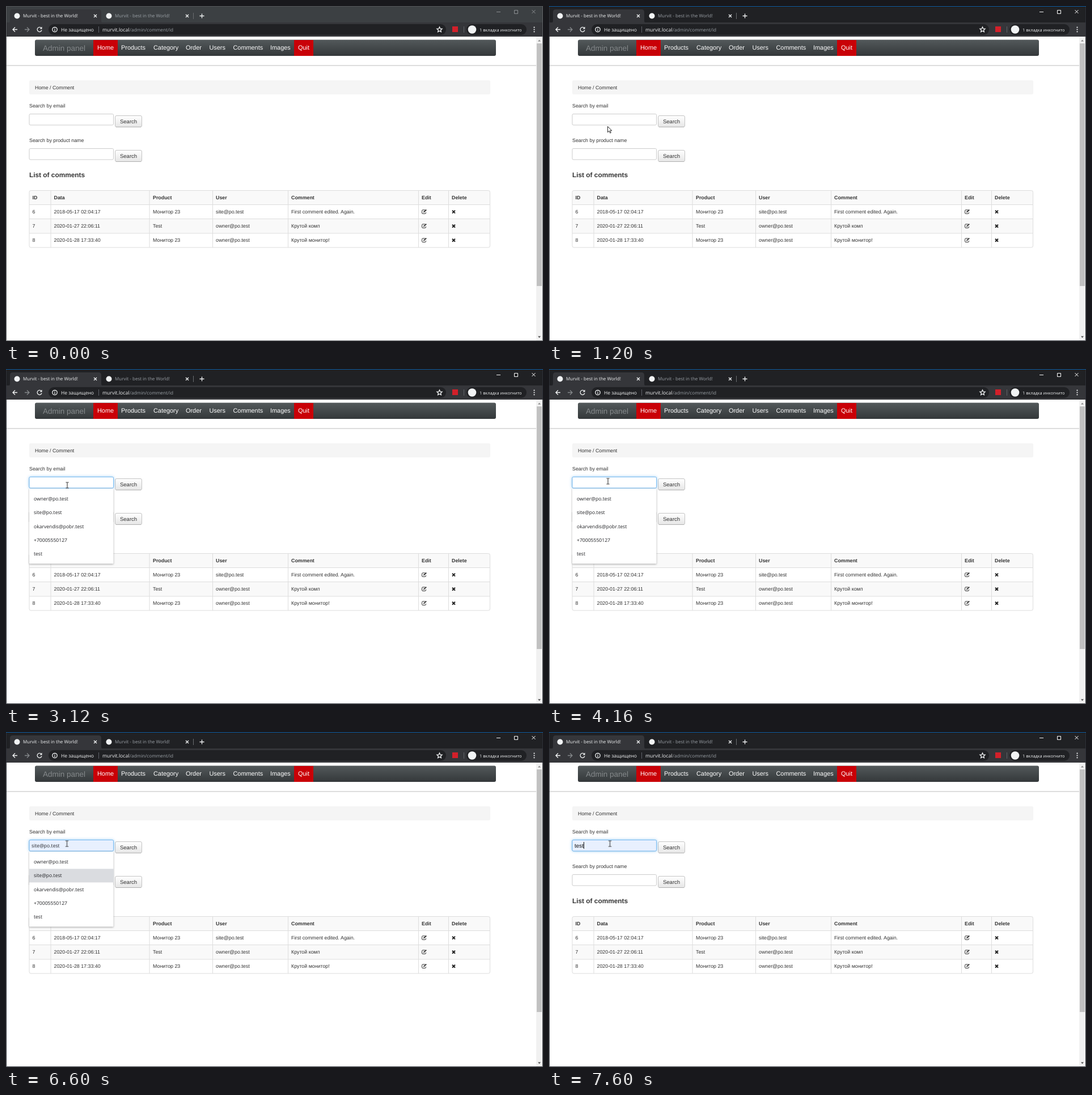
Write an HTML page that moves like this. It is 947 px wide and 591 px high and loops after 8 s.

```html
<!DOCTYPE html>
<html lang="en">
<head>
<meta charset="utf-8">
<title>Comment search</title>
<style>
html, body { margin: 0; width: 100%; height: 100%; overflow: hidden; background: #fff; }
svg { display: block; width: 947px; height: 591px; }
text { font: 8.85px "Liberation Sans", Arial, sans-serif; fill: #333; text-rendering: geometricPrecision; }
rect { shape-rendering: crispEdges; }
.round { shape-rendering: auto; }
.ui text { font-family: "Open Sans", "Noto Sans", sans-serif; font-size: 8px; fill: #f1f3f4; }
.ui .dim { fill: #9aa0a6; }
.ui .url { font-size: 8.5px; }
.line { fill: none; stroke: #f1f3f4; stroke-width: 1.3; }
.nav text { font-size: 10.9px; fill: #fff; }
.nav .brand { font-size: 13.5px; fill: #85898b; }
.button text { font-size: 9.5px; }
.field { fill: #fff; stroke: #ccc; }
.bold { font-weight: bold; }
.list text { font: 500 8.6px "Open Sans", "Noto Sans", sans-serif; fill: #202124; }

/* One loop lasts 8 s, so 1% is 80 ms. */
.frame, .edge, .accent, .controls, .focus, .arrow, .beam, .click, .caret, .menu, .hover, .preview, .typed, .fill {
  animation: 8s step-end infinite;
}
.frame { animation-name: frame; }
.edge { animation-name: edge; }
.accent { animation-name: accent; }
.controls { animation-name: controls; }
.focus { animation-name: focus; animation-timing-function: linear; filter: drop-shadow(0 0 2.5px rgba(82,168,236,.6)); }
.fill { animation-name: fill; }
.arrow { animation-name: arrow; animation-timing-function: linear; }
.beam { animation-name: beam; animation-timing-function: linear; }
.click { animation-name: click; }
.caret { animation-name: caret; }
.menu { animation-name: menu; }
.menu .panel { filter: drop-shadow(0 1px 1.5px rgba(0,0,0,.35)); }
.hover { animation-name: hover; }
.preview { animation-name: preview; }
.typed { animation-name: typed; }

@keyframes frame { 0% { fill: #3c4043; } 13%, 100% { fill: #202124; } }
@keyframes edge { 0% { stroke: #5c5f62; } 13%, 100% { stroke: #2c2f36; } }
@keyframes accent { 0% { fill: #505356; } 13%, 100% { fill: #0b5aa0; } }
@keyframes controls { 0% { stroke: #8b8e91; } 13%, 100% { stroke: #fff; } }
@keyframes focus { 0%, 29.5% { opacity: 0; } 32%, 100% { opacity: 1; } }
@keyframes fill { 0% { fill: #fff; } 80%, 100% { fill: #e8f0fe; } }
@keyframes arrow {
  0%, 4.99% { transform: translate(905px,585px); opacity: 0; }
  5% { transform: translate(880px,572px); opacity: 1; animation-timing-function: cubic-bezier(.2,.6,.3,1); }
  12%, 17.49% { transform: translate(103px,212px); }
  17.5%, 19% { transform: translate(104px,212px); }
  19.99% { transform: translate(105px,211px); opacity: 1; }
  20%, 100% { transform: translate(105px,211px); opacity: 0; }
}
@keyframes beam {
  0%, 19.99% { transform: translate(107px,210px); opacity: 0; }
  20% { transform: translate(107px,210px); opacity: 1; }
  21.5%, 27.9% { transform: translate(110px,208px); }
  28%, 30% { transform: translate(109px,209px); }
  34.5%, 43.5% { transform: translate(108px,205px); }
  45%, 49.5% { transform: translate(107.5px,204.5px); }
  52%, 56.5% { transform: translate(104px,198px); }
  58%, 100% { transform: translate(107.5px,197px); opacity: 1; }
}
@keyframes click {
  0% { transform: translate(103px,212px); opacity: 0; }
  13% { transform: translate(103px,212px); opacity: 1; }
  15% { transform: translate(108.5px,208px); opacity: 0; }
  29.5% { transform: translate(108.5px,208px); opacity: 1; }
  31% { transform: translate(108px,205px); opacity: 0; }
  32.5% { transform: translate(108px,205px); opacity: 1; }
  34.5% { transform: translate(107.5px,204.5px); opacity: 0; }
  45.5% { transform: translate(107.5px,204.5px); opacity: 1; }
  48%, 100% { opacity: 0; }
}
@keyframes caret {
  0%, 39%, 52%, 65%, 78%, 93% { opacity: 0; }
  29.5%, 45.5%, 58%, 71.5%, 86.5% { opacity: 1; transform: none; }
  95%, 100% { opacity: 1; transform: translateX(16px); }
}
@keyframes menu { 0% { opacity: 0; } 32.5% { opacity: 1; } 95%, 100% { opacity: 0; } }
@keyframes hover {
  0% { opacity: 0; }
  80% { opacity: 1; transform: none; }
  82.5% { transform: translateY(24.4px); }
  84.5% { transform: translateY(48.8px); }
  86.5% { transform: translateY(73.2px); }
  88.5%, 100% { opacity: 1; transform: translateY(97.6px); }
}
@keyframes preview {
  0% { opacity: 0; }
  80% { opacity: 1; transform: none; }
  82.5% { transform: translateY(-24.4px); }
  84.5% { transform: translateY(-48.8px); }
  87% { transform: translateY(-73.2px); }
  88.5% { opacity: 1; transform: translateY(-97.6px); }
  95%, 100% { opacity: 0; transform: translateY(-97.6px); }
}
@keyframes typed { 0% { opacity: 0; } 95%, 100% { opacity: 1; } }
</style>
</head>
<body>
<svg viewBox="0 0 947 591">
  <defs>
    <linearGradient id="bar" x2="0" y2="1"><stop stop-color="#53595b"/><stop offset="1" stop-color="#34383a"/></linearGradient>
    <linearGradient id="key" x2="0" y2="1"><stop stop-color="#fff"/><stop offset="1" stop-color="#e6e6e6"/></linearGradient>
    <clipPath id="inside"><rect x="42" y="191" width="147" height="19"/></clipPath>
    <g id="search" class="button">
      <rect class="round" x="192.5" y=".5" width="47" height="20" rx="2.5" fill="url(#key)" stroke="#c4c4c4"/>
      <path d="M194 20.5h44" stroke="#b0b0b0"/>
      <text x="201" y="14">Search</text>
    </g>
    <path id="cross" d="M-2.5-2.5l5 5m0-5l-5 5"/>
    <g id="edit" fill="none" stroke="#333">
      <path d="M6.5 1.2H2Q.6 1.2.6 2.6V6.4Q.6 7.8 2 7.8H6Q7.4 7.8 7.4 6.4V5.2"/>
      <path d="M3.4 5.4L8.3.9" stroke-width="1.7"/>
    </g>
  </defs>

  <g class="ui">
    <rect class="frame" width="947" height="30"/>
    <rect class="accent" width="947" height="1"/>
    <path d="M3 30Q7 30 7 26V11Q7 6 12 6H163Q168 6 168 11V26Q168 30 172 30Z" fill="#35363a"/>
    <rect y="29" width="947" height="25" fill="#35363a"/>
    <circle cx="19.5" cy="17.5" r="5" fill="#f1f3f4"/>
    <circle cx="181.5" cy="17.5" r="5" fill="#f1f3f4"/>
    <text x="30" y="20">Murvit - best in the World!</text>
    <text x="192" y="20" class="dim">Murvit - best in the World!</text>
    <g class="line">
      <use href="#cross" x="157.5" y="17.5"/>
      <use href="#cross" x="319.5" y="17.5"/>
      <path d="M341.500 17.500h8m-4-4v8"/>
      <path d="M20 41.500h-8m4-4l-4 4 4 4"/>
      <path d="M33 41.500h8m-4-4l4 4-4 4" stroke="#84878a"/>
      <path d="M62.300 39A4 4 0 1 0 63 42.500"/>
    </g>
    <path d="M63.500 36.500v4h-4z" fill="#f1f3f4"/>
    <path d="M330.500 12v11" stroke="#6a6d70"/>
    <rect class="round" x="75" y="32" width="701" height="19" rx="9.500" fill="#202124"/>
    <g class="line" stroke-width="1">
      <circle cx="86" cy="41.500" r="4.200"/>
      <path d="M86 41v3m0-5.300v1.200"/>
      <path d="M764.500 37l1.300 3 3.200.3-2.400 2.100.7 3.200-2.800-1.700-2.800 1.700.7-3.200-2.400-2.100 3.200-.3z"/>
    </g>
    <text x="97" y="45" font-size="8.600" class="url">Не защищено</text>
    <path d="M163.500 36v11M807.500 36v11" stroke="#5f6368"/>
    <text x="170" y="45" class="url" style="font-size:8.700px">murvit.local</text>
    <text x="218" y="45" class="dim" style="font-size:8.200px">/admin/comment/id</text>
    <rect x="787" y="36" width="10" height="10" fill="#d3202a"/>
    <rect class="round" x="812" y="32" width="106" height="19" rx="9.500" fill="#202124"/>
    <circle cx="822" cy="41.500" r="7.300" fill="#f1f3f4"/>
    <text x="835" y="44.500" style="font-size:7.400px">1 вкладка инкогнито</text>
    <g fill="#f1f3f4"><circle cx="931.500" cy="37.700" r="1.100"/><circle cx="931.500" cy="41.500" r="1.100"/><circle cx="931.500" cy="45.300" r="1.100"/></g>
    <path class="controls" d="M865 10.500h7M896.500 7.500h6v6h-6zM927.500 7l6 6m0-6l-6 6" fill="none"/>
  </g>

  <g class="nav">
    <rect class="round" x="51" y="59.500" width="813" height="28.500" rx="3" fill="url(#bar)"/>
    <path d="M154 60h43v28h-43zM508 60h34v28h-34z" fill="#c90007"/>
    <text x="65" y="78.500" class="brand">Admin panel</text>
    <text x="161" y="77">Home</text>
    <text x="203" y="77">Products</text>
    <text x="260" y="77">Category</text>
    <text x="317" y="77">Order</text>
    <text x="358.500" y="77">Users</text>
    <text x="400.500" y="77">Comments</text>
    <text x="466" y="77">Images</text>
    <text x="515" y="77">Quit</text>
  </g>
  <path d="M1 105h934" stroke="#d2d2d2" stroke-width="1.500"/>

  <rect class="round" x="41" y="131" width="813" height="25" rx="3" fill="#f5f5f5"/>
  <text x="51" y="146.500">Home / Comment</text>
  <text x="41" y="179">Search by email</text>
  <rect class="field round" x="41" y="190.500" width="148.500" height="19.500" rx="2"/>
  <use href="#search" y="193"/>
  <text x="41" y="240">Search by product name</text>
  <rect class="field round" x="41" y="251.500" width="148.500" height="19.500" rx="2"/>
  <use href="#search" y="254"/>
  <text x="41" y="302" class="bold" style="font-size:11.850px">List of comments</text>

  <g id="table">
    <path d="M41 325.500h813v25h-813zM41 375.500h813v25h-813z" fill="#f9f9f9"/>
    <rect class="round" x="41" y="325.500" width="812.500" height="100.500" rx="3" fill="none" stroke="#ddd"/>
    <path d="M41 350.500h813m-813 25h813m-813 25.500h813M79 325.500v100.500M253 325.500v100.500M364.500 325.500v100.500M497.500 325.500v100.500M727.500 325.500v100.500M780.500 325.500v100.500" stroke="#ddd"/>
  </g>

  <rect x="935" y="54" width="12" height="537" fill="#f1f1f1"/>
  <rect x="936" y="66" width="9" height="428" fill="#c1c1c1"/>
  <path d="M938 62.500l2.500-3 2.500 3z" fill="#8a8a8a"/>
  <path d="M938 582.500l2.500 3 2.500-3z" fill="#505050"/>
  <path class="edge" d="M.5 1V590.500H946.500V1" fill="none"/>

  <g class="focus"><rect class="fill round" x="41" y="190.500" width="148.500" height="19.500" rx="2" stroke="#75b9f0"/></g>
  <g clip-path="url(#inside)" class="list"><g class="preview" id="preview"></g></g>
  <text x="45" y="203.500" class="typed" style="font-size:9.900px;fill:#111">test</text>
  <rect class="caret" x="45" y="194" width="1" height="12" fill="#111"/>

  <g class="menu list" id="menu">
    <rect class="panel round" x="41" y="211" width="148.500" height="132.500" rx="1" fill="#fff"/>
    <rect class="hover" x="41" y="216.600" width="149" height="24.400" fill="#dadce0"/>
  </g>

  <path class="arrow" d="M.5.5V10.800L3 8.500 4.700 12.200 6.300 11.500 4.700 7.900H7.800Z" fill="#fff" stroke="#111" stroke-width=".9"/>
  <path class="beam" d="M-2.500-5H-.6L0-4.500.6-5H2.500M0-4.500V4.500M-2.500 5H-.6L0 4.500.6 5H2.500" fill="none" stroke="#222"/>
  <circle class="click" r="8" fill="#ff0" fill-opacity=".47"/>
</svg>

<script>
const SVG = "http://www.w3.org/2000/svg";

function add(parent, tag, attrs, content = "") {
  const node = document.createElementNS(SVG, tag);
  for (const key in attrs) node.setAttribute(key, attrs[key]);
  node.textContent = content;
  document.getElementById(parent).append(node);
}

const columns = [46.5, 84.5, 259, 370, 503, 733, 786];
const rows = [
  ["ID", "Data", "Product", "User", "Comment", "Edit", "Delete"],
  ["6", "2018-05-17 02:04:17", "Монитор 23", "site@po.test", "First comment edited. Again."],
  ["7", "2020-01-27 22:06:11", "Test", "owner@po.test", "Крутой комп"],
  ["8", "2020-01-28 17:33:40", "Монитор 23", "owner@po.test", "Крутой монитор!"]
];
rows.forEach((cells, r) => {
  const y = 341 + r * 25.1;
  cells.forEach((cell, c) => add("table", "text", { x: columns[c], y, class: r ? "" : "bold" }, cell));
  if (r) {
    add("table", "use", { href: "#edit", x: 733, y: y - 7.5 });
    add("table", "use", { href: "#cross", x: 789.5, y: y - 3, stroke: "#222", "stroke-width": 2 });
  }
});

const suggestions = ["owner@po.test", "site@po.test", "okarvendis@pobr.test", "+70005550127", "test"];
suggestions.forEach((value, i) => {
  add("menu", "text", { x: 49, y: 231.7 + i * 24.4 }, value);
  add("preview", "text", { x: 45, y: 203.2 + i * 24.4 }, value);
});
</script>
</body>
</html>
```
